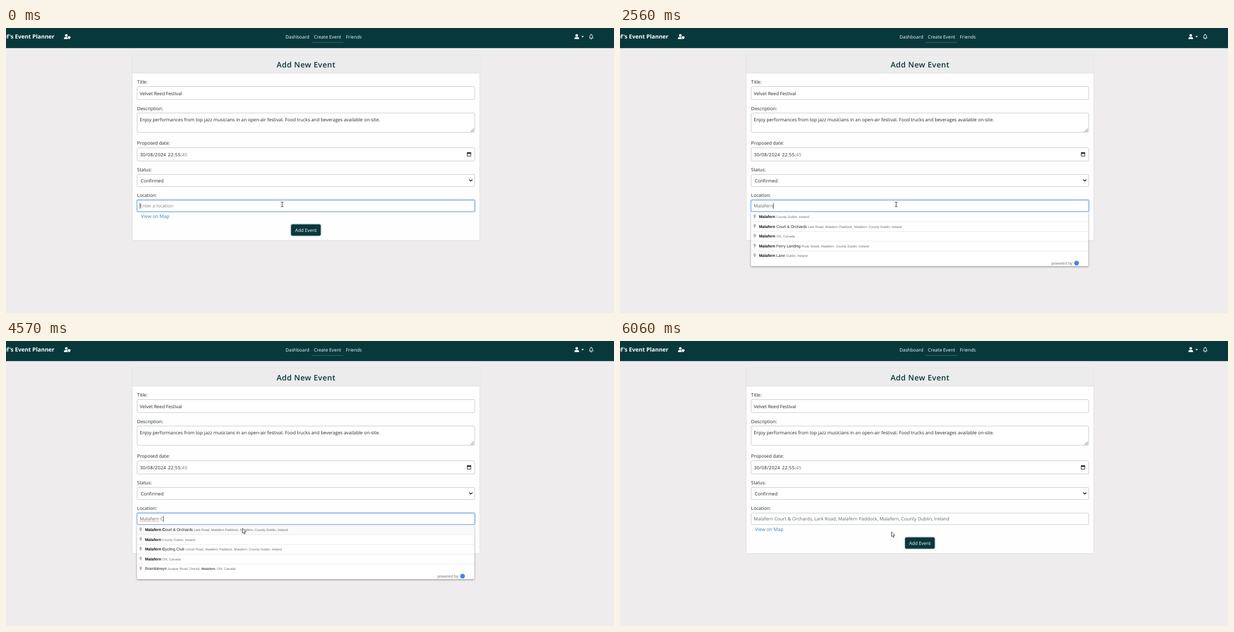
Write an HTML page that moves like this. It is 1092 px wide and 513 px high and loops after 6.13 s.

```html
<!DOCTYPE html>
<html lang="en">
<head>
<meta charset="utf-8">
<title>Event Planner</title>
<style>
  html, body { margin: 0; width: 100%; height: 100%; overflow: hidden; background: #eeecec; }
  svg { display: block; width: 100%; height: 100%; }
  text { font: 8.3px "Open Sans", "Noto Sans", sans-serif; fill: #212529; white-space: pre; text-rendering: geometricPrecision; }
  .nav text { fill: #fff; }
  .brand { font-weight: 700; font-size: 10.2px; }
  .head { font-weight: 600; font-size: 13.8px; letter-spacing: .4px; fill: #07393c; }
  .date { letter-spacing: .3px; }
  .field { fill: #fff; stroke: #c6cacd; }
  .list text { font: 7.07px "Liberation Sans", Arial, sans-serif; fill: #222; }
  .list .sub { font-size: 6px; fill: #707070; }
  .list .hit { font-weight: 700; fill: #111; }
  .list .sub.hit { fill: #555; }
  .list .by { font-size: 7.3px; fill: #757575; }
</style>
</head>
<body>
<svg viewBox="0 0 1092 513" xmlns="http://www.w3.org/2000/svg">
  <rect width="1092" height="513" fill="#eeecec"/>

  <g class="nav">
    <rect width="1092" height="36" fill="#07393c"/>
    <rect y="35.5" width="1092" height="1" fill="#07393c" opacity=".4"/>
    <text class="brand" x="87" y="19.4" text-anchor="end">Oluf's Event Planner</text>
    <text x="502" y="18.7">Dashboard</text>
    <text x="553" y="18.7">Create Event</text>
    <text x="610.5" y="18.7">Friends</text>
    <path d="M549 26H606" stroke="#fff" stroke-opacity=".3" stroke-width=".8"/>
    <g fill="#fff">
      <circle cx="108.3" cy="13.3" r="2.4"/>
      <path d="M104.2 20V18.6Q104.2 16.2 106.8 16.2H110.3V18.2L111.6 20Z"/>
      <path d="M113.1 14.6L116 15.7Q116.1 18.9 113.1 20.3Q110.6 18.9 110.7 15.7Z"/>
      <circle cx="1025.1" cy="13.3" r="2.4"/>
      <path d="M1021 20V18.7Q1021 16.2 1023.6 16.2H1026.6Q1029.2 16.2 1029.2 18.7V20Z"/>
      <path d="M1033.2 14.5H1038L1035.6 16.9Z"/>
      <path d="M1049.9 19H1052.3Q1052 20.4 1051.1 20.4Q1050.2 20.4 1049.9 19Z"/>
      <rect x="1050.6" y="10.6" width="1" height="1.6"/>
    </g>
    <path d="M1047.7 18Q1048.7 17.2 1048.7 14.6Q1048.7 12.1 1051.1 12.1Q1053.5 12.1 1053.5 14.6Q1053.5 17.2 1054.5 18Z" fill="none" stroke="#fff"/>
  </g>

  <rect x="226.5" y="48.8" width="624.5" height="333.6" rx="2" fill="#fefefe" stroke="#dedede"/>
  <path d="M227 49.3H850.5V81H227Z" fill="#ececec"/>
  <path d="M227 81H850.5" stroke="#d9d9d9"/>
  <text class="head" x="538.9" y="70.6" text-anchor="middle">Add New Event</text>

  <text x="235.6" y="100">Title:</text>
  <text x="235.6" y="147.6">Description:</text>
  <text x="235.6" y="210.3">Proposed date:</text>
  <text x="235.6" y="258.2">Status:</text>
  <text x="235.6" y="303.8">Location:</text>

  <g class="field">
    <rect x="235.5" y="105.5" width="606.3" height="23.3" rx="2"/>
    <rect x="235.5" y="153" width="606.3" height="34.8" rx="2"/>
    <rect x="235.5" y="215.6" width="606.3" height="23.8" rx="2"/>
    <rect x="235.5" y="263.6" width="606.3" height="21.8" rx="2"/>
    <rect x="235.5" y="309.8" width="606.3" height="20.6" rx="2"/>
  </g>
  <text x="240.3" y="120.6">Velvet Reed Festival</text>
  <text x="240.3" y="168.1">Enjoy performances from top jazz musicians in an open-air festival. Food trucks and beverages available on-site.</text>
  <path d="M834.6 186.9L840.2 181.3M838 187L840.4 184.6" stroke="#444" stroke-width=".9"/>
  <g class="date">
    <text x="240.5" y="230.8">30/08/2024</text>
    <text x="291" y="230.8">22:55:</text>
    <text x="316" y="230.8" style="fill:#777">45</text>
  </g>
  <path d="M828.4 224.6H834.8V230.8H828.4Z" fill="none" stroke="#111" stroke-width=".9"/>
  <path d="M828 224H835.2V226.2H828ZM829.2 223.2H830.2V225H829.2ZM833 223.2H834V225H833Z" fill="#111"/>
  <text x="242" y="278">Confirmed</text>
  <path d="M831.9 272.7L834.8 275.6L837.7 272.7" fill="none" stroke="#222" stroke-width="1.4"/>
  <text x="242.6" y="342.1" style="font-size:8.5px;fill:#2186d4">View on Map</text>
  <rect x="512" y="353.6" width="53.2" height="20.2" rx="2.5" fill="#07393c" style="filter:drop-shadow(0 .5px 1.5px #07393c99)"/>
  <text x="538.7" y="366.7" text-anchor="middle" style="fill:#fff">Add Event</text>

  <g id="focus" fill="none">
    <rect x="235" y="309.3" width="607.3" height="21.6" rx="2.5" stroke="#0d6efd" stroke-opacity=".25" stroke-width="2.4"/>
    <rect x="235.5" y="309.8" width="606.3" height="20.6" rx="2" stroke="#86b7fe"/>
  </g>
  <text id="value" x="240.3" y="323.3"></text>
  <path id="typo" d="M240.5 324.9H275.3" stroke="#e0603c" stroke-width="1" stroke-dasharray="1.1 .9"/>
  <path id="caret" stroke="#222" stroke-width=".8"/>

  <g id="list" class="list">
    <rect x="235.2" y="331.2" width="606" height="97.6" rx="1" fill="#fff" style="filter:drop-shadow(0 1px 1.6px #0007)"/>
    <rect id="hover" x="235.2" y="331.2" width="606" height="17.4" fill="#f9f9f9"/>
    <g id="rows"></g>
    <text class="by" x="775" y="425.7">powered by</text>
    <circle cx="820" cy="423.2" r="4.2" fill="#4285f4"/>
  </g>

  <path id="beam" d="M-2.4-4.4Q-.4-4.4 0-3.6Q.4-4.4 2.4-4.4M0-3.6V3.6M-2.4 4.4Q-.4 4.4 0 3.6Q.4 4.4 2.4 4.4" fill="none" stroke="#222" stroke-width=".9"/>
  <path id="arrow" d="M0 0V8.6L2 6.8L3.5 10.2L4.9 9.6L3.5 6.3H6.2Z" fill="#fff" stroke="#222" stroke-width=".8"/>
</svg>
<script>
const LOOP = 6130, PICK = 5340, MOVE = 4170, ARRIVE = 4990, LEAVE = 5990;
const $ = id => document.getElementById(id);
const ui = {};
for (const id of ["focus", "value", "typo", "caret", "list", "hover", "rows", "beam", "arrow"]) ui[id] = $(id);

const QUERY = "Malafern C";
const COURT = "Malafern Court & Orchards", COURT_AT = "Lark Road, Malafern Paddock, Malafern, County Dublin, Ireland";
const COUNTY = "Malafern|County Dublin, Ireland", ONTARIO = "Malafern|ON, Canada";
const TOWN = [COUNTY, COURT + "|" + COURT_AT, ONTARIO,
  "Malafern Ferry Landing|Rook Street, Malafern, County Dublin, Ireland", "Malafern Lane|Dublin, Ireland"];

// start time, number of letters typed
const TYPED = [[0, 0], [210, 1], [620, 2], [1350, 3], [1490, 4], [1750, 5], [2010, 6], [2220, 7], [2490, 8], [2780, 9], [3250, 10]];
// start time, highlighted pattern, suggestions
const LISTS = [
  [350, "M", ["Malta", "Monaco", "Mexico", "Maldives", "Malaysia"]],
  [750, "Ma", ["Malta", "Maldives", "Malaysia", "Madrid|Spain", "Mauritius"]],
  [1490, "M[aá]l", ["Malta", "Maldives", "Malaysia", "Málaga|Spain", "Malawi"]],
  [1610, "M[aá]la", ["Malaysia", "Málaga|Spain", "Malawi", COUNTY, ONTARIO]],
  [1820, "Malaf", TOWN],
  [2220, "Malafer", TOWN],
  [2560, "Malafern", TOWN],
  [3590, "Malafern( C)?", [COURT + "|" + COURT_AT, COUNTY,
    "Malafern Cycling Club|Linnet Road, Malafern Paddock, Malafern, County Dublin, Ireland",
    ONTARIO, "Bramblewyn|Juniper Road, Orwick, Malafern, ON, Canada"]]
];

const latest = (steps, t) => steps.filter(s => s[0] <= t).pop();

function make(parent, tag, attrs, text = "") {
  const node = document.createElementNS("http://www.w3.org/2000/svg", tag);
  for (const k in attrs) node.setAttribute(k, attrs[k]);
  node.textContent = text;
  return parent.appendChild(node);
}

function fillRow(line, pattern, i) {
  const y = 342.1 + 17.55 * i;
  make(ui.rows, "path", { d: `M239.7 ${y - 4.4}a2.2 2.2 0 0 1 4.4 0q0 1.5-2.2 5.2q-2.2-3.7-2.2-5.2Z`, fill: "#aaa" });
  make(ui.rows, "circle", { cx: 241.9, cy: y - 4.4, r: .8, fill: "#fff" });
  if (i) make(ui.rows, "path", { d: `M235.2 ${331 + 17.6 * i}h606`, stroke: "#e6e6e6", "stroke-width": .8 });
  const text = make(ui.rows, "text", { x: 249.7, y });
  let found = false;
  line.split("|").forEach((part, k) => {
    const kind = k ? "sub" : "main";
    const m = found ? null : part.match(pattern);
    const at = m ? m.index : part.length, end = m ? at + m[0].length : at;
    const bits = [[part.slice(0, at), kind], [part.slice(at, end), kind + " hit"], [part.slice(end), kind]];
    found = found || !!m;
    bits.filter(b => b[0]).forEach(([s, cls], n) =>
      make(text, "tspan", k && !n ? { class: cls, dx: 1.8 } : { class: cls }, s));
  });
}

let shown = null;
function showList(list) {
  if (list === shown) return;
  shown = list;
  ui.rows.textContent = "";
  if (list) list[2].forEach((line, i) => fillRow(line, list[1], i));
}

function pointer(t) {
  if (t < MOVE) return [496, 317.5];
  if (t < LEAVE) {
    const u = Math.min(1, Math.floor((t - MOVE) / (ARRIVE - MOVE) * 12 + .01) / 12);
    const e = 1 - (1 - u) ** 2;
    return [465.3 - 61.6 * e, 321 + 24.6 * e];
  }
  return t < 6060 ? [437, 346] : [487.4, 343.5];
}

const show = (node, on) => node.setAttribute("visibility", on ? "visible" : "hidden");

function draw(t) {
  const [since, count] = latest(TYPED, t);
  const picked = t >= PICK;
  const value = picked ? COURT + ", " + COURT_AT : QUERY.slice(0, count);
  ui.value.textContent = value || "Enter a location";
  ui.value.style.fill = value ? "#5f6468" : "#7b8187";

  const blink = Math.floor((t - since) / 500) % 2 === 0;
  show(ui.caret, !picked && blink);
  const x = 240.7 + (value ? ui.value.getComputedTextLength() : 0);
  ui.caret.setAttribute("d", `M${x} 315V325.6`);
  show(ui.typo, !picked && count > 8);
  ui.focus.setAttribute("opacity", Math.max(0, Math.min(1, (PICK + 150 - t) / 150)));

  const list = picked ? null : latest(LISTS, t);
  showList(list);
  ui.list.setAttribute("display", list ? "inline" : "none");

  const [px, py] = pointer(t);
  const arrow = py > 331;
  ui.hover.setAttribute("display", arrow ? "inline" : "none");
  show(ui.arrow, arrow);
  show(ui.beam, !arrow);
  (arrow ? ui.arrow : ui.beam).setAttribute("transform", `translate(${px} ${py})`);
}

const start = performance.now();
function tick() {
  draw((performance.now() - start) % LOOP);
  requestAnimationFrame(tick);
}
tick();
</script>
</body>
</html>
```
